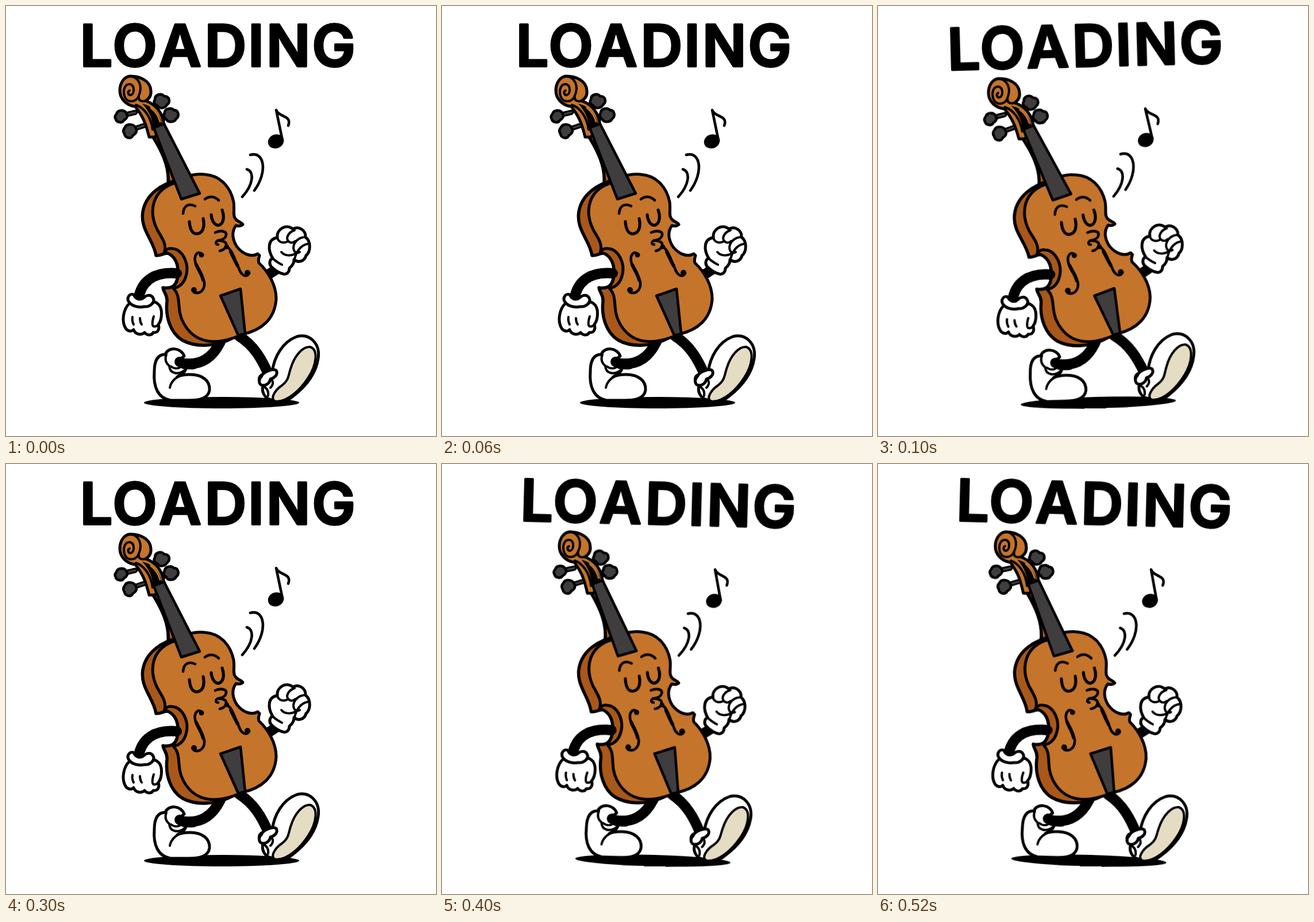
An HTML page that plays this animation: 748 px wide and 748 px high, repeating every 0.6 s.

```html
<!DOCTYPE html>
<html lang="en">
<head>
<meta charset="utf-8">
<title>Loading</title>
<style>
  html, body { margin: 0; width: 100%; height: 100%; overflow: hidden; background: #fff; }
  svg { display: block; width: 100vw; height: 100vh; }
  #scene { transform-origin: 374px 374px; }
  path, ellipse, circle { stroke-linecap: round; stroke-linejoin: round; }
  .ink { fill: none; stroke: #000; stroke-width: 4.6; }
  .thin { stroke-width: 4; }
  .limb { fill: none; stroke: #000; stroke-width: 18; }
  .glove { fill: #fff; stroke: #000; stroke-width: 5; }
  .front { fill: #c5742b; stroke: #000; stroke-width: 5; }
  .side { fill: #a9581a; stroke: #000; stroke-width: 5.5; }
  .ebony { fill: #3f3d3d; stroke: #000; stroke-width: 4.5; }
  .sole { fill: #e5dcc4; stroke: #000; stroke-width: 4; }
  .title { font: 600 101px Inter, "Open Sans", sans-serif; text-anchor: middle;
    stroke: #000; stroke-width: 3.5; stroke-linejoin: round; }
</style>
</head>
<body>
<svg viewBox="0 0 748 748">
<g id="scene">
  <text class="title" y="104.5" x="157 224 303 382 435 491 570">LOADING</text>

  <ellipse cx="375" cy="690" rx="135" ry="10"/>

  <!-- whistle and note -->
  <path class="ink" d="M419 284C432 288 431 310 411 332M425 259C449 252 456 288 432 321"/>
  <g transform="translate(1)">
    <ellipse cx="468.500" cy="235.500" rx="14" ry="12" transform="rotate(-22 468.500 235.500)"/>
    <path class="ink" d="M480 234L469 181C474 194 497 190 490 208"/>
  </g>

  <!-- legs -->
  <path class="limb" d="M373 584C359 613 337 627 304 621"/>
  <path class="limb" d="M405 574C431 590 445 614 457 642"/>

  <!-- rear shoe -->
  <path class="glove" d="M277 606C282 592 305 594 310 609L302 615C296 618 299 628 313 630C312 638 304 641 298 645C304 642 312 641 320 641C342 641 355 652 354 668C352 683 336 686 318 686H286C264 682 256 662 258 636C258 615 265 606 277 606Z"/>
  <path class="limb" d="M326 623C316 624 308 622 302 619"/>
  <path class="ink thin" d="M279 606C276 614 278 621 284 626C285 640 299 642 310 634M287 627C292 631 298 631 302 629M285 664C287 653 296 645 306 642"/>

  <!-- leading shoe -->
  <path class="glove" d="M463 637C466 611 481 584 506 575C529 569 547 588 543 613C539 640 521 662 499 679C487 689 471 691 461 685C450 682 444 672 447 660C438 656 438 643 447 641Z"/>
  <path class="sole" d="M495 631C502 607 517 592 529 593C544 598 540 625 526 646C512 668 490 688 470 688C457 685 468 668 480 660C492 651 491 643 495 631Z"/>
  <path class="glove" d="M444 645C447 636 465 630 470 634C474 641 467 647 460 649C459 655 454 660 447 660C439 659 439 650 444 645Z"/>
  <path class="ink thin" d="M460 649C465 651 466 658 460 664M447 661C455 665 457 671 456 678"/>

  <!-- raised fist -->
  <path class="limb" d="M447 472C455 468 462 464 469 459"/>
  <path class="glove" d="M472 403C470 388 488 378 499 388C509 382 522 390 521 402C531 410 530 427 522 434C519 445 508 447 501 441C501 448 497 453 493 456C493 463 488 468 482 466C473 464 466 458 461 453C457 448 459 440 464 439C455 424 455 405 472 403Z"/>
  <path class="ink thin" d="M502 390C492 393 486 403 491 409C495 413 500 412 503 409M521 402C509 402 500 411 500 421C501 429 506 431 511 428M524 414C513 416 505 427 502 440M472 403C474 411 482 414 491 409M479 428C485 435 496 435 503 431M464 439C470 445 476 448 480 450"/>

  <!-- neck -->
  <path class="side" d="M254 225L264 222L306 294L301 306L282 307C284 279 271 252 254 225Z"/>

  <!-- ribs -->
  <path class="side" d="M302 302C270 309 243 328 238 358C233 389 257 407 261 434C268 435 274 430 281 430C291 434 298 444 299 458C300 474 297 483 290 488C284 491 278 491 273 490C274 499 281 501 280 514C277 541 286 568 306 581C331 595 367 592 393 578Z"/>

  <!-- belly -->
  <path class="front" d="M300 306C313 294 333 291 346 293C374 295 391 316 396 341C398 355 394 364 399 370C403 376 409 375 412 380C409 383 404 383 400 382C391 394 395 409 402 419C413 433 428 437 438 431L441 434C440 439 438 441 440 447C456 462 470 485 470 509C468 545 444 564 412 571C392 580 372 586 352 583C319 578 302 548 301 522C300 507 299 499 291 491C303 489 311 481 314 466C318 447 307 423 289 422C280 421 277 425 275 430C281 414 270 402 263 389C248 358 252 318 300 306Z"/>

  <!-- pegs behind -->
  <path class="ink" style="stroke-width:9" d="M254 177L267 170M267 199L282 192"/>
  <g class="ebony">
    <path d="M259 163C259 153 271 151 275 157C284 156 287 167 280 172C276 179 266 179 263 173C258 171 256 167 259 163Z"/>
    <path d="M276 186C276 178 288 176 292 181C301 181 302 193 296 196C293 203 281 203 279 197C274 195 273 189 276 186Z"/>
  </g>

  <g transform="translate(2 1)">
    <!-- scroll and pegbox -->
    <path class="front" d="M214 121C231 121 249 129 250 146C251 155 246 161 241 164C258 170 270 183 273 206L257 227L247 227C242 207 238 193 223 174C208 172 196 161 196 146C196 132 204 122 214 121Z"/>
    <path d="M235 169C251 172 267 186 270 207L253 215C255 198 247 182 235 169Z"/>
    <path d="M250 176C260 184 263 191 266 200" fill="none" stroke="#c5742b" stroke-width="3"/>
    <path class="ink thin" d="M214 121C230 123 236 139 229 155C225 167 208 169 204 155C201 143 206 134 214 135C222 137 222 152 215 154C210 154 209 148 213 146M229 157C228 163 233 166 241 164M224 171C238 176 250 191 253 214"/>

    <!-- pegs in front -->
    <path class="ink" style="stroke-width:9" d="M202 189L223 184M217 214L238 207"/>
    <path d="M202 189L223 184M217 214L238 207" fill="none" stroke="#3f3d3d" stroke-width="3"/>
    <g class="ebony">
      <path d="M190 187C192 179 204 179 207 185C212 190 207 196 203 198C200 204 190 201 189 196C187 193 187 190 190 187Z"/>
      <path d="M205 210C208 203 220 204 223 210C228 217 223 222 219 224C215 232 204 228 204 221C201 218 202 213 205 210Z"/>
    </g>
  </g>

  <!-- fingerboard and tailpiece -->
  <path class="ebony" d="M257 212L275 205L337 326L305 336Z"/>
  <path class="ebony" d="M373 504L408 492L416 570L404 573Z"/>

  <!-- face -->
  <path class="ink" d="M308 361C309 346 319 343 329 348M346 336C354 330 363 331 370 338"/>
  <path class="ink" style="stroke-width:5.200" d="M319 375C320 391 326 398 334 396C343 394 346 383 343 370M357 363C358 376 365 383 371 381C379 378 380 366 376 355"/>
  <path class="ink" d="M364 394C372 390 384 391 383 398C382 405 376 407 368 408C378 408 384 411 383 416C382 422 376 425 372 426M366 410C364 413 366 415 369 415"/>

  <!-- sound holes -->
  <path class="ink" d="M340 431C334 425 327 433 329 444C331 458 343 469 345 481C346 494 337 502 327 498M383 418C395 425 398 443 405 456C409 469 418 473 423 465"/>
  <path class="ink" style="stroke-width:6" d="M331 450C335 459 341 467 343 477M391 428C396 438 399 445 403 452"/>
  <circle cx="340" cy="433" r="4.500"/>
  <circle cx="327" cy="494" r="5"/>
  <circle cx="384" cy="419" r="4"/>
  <circle cx="420" cy="464" r="5"/>

  <!-- swinging arm -->
  <path class="limb" d="M297 465C259 462 235 477 230 511"/>
  <path class="glove" d="M215 517C204 527 200 549 209 562C214 567 219 566 222 563C225 572 236 573 241 568C246 574 254 573 256 568C266 569 267 560 265 554C272 545 273 524 264 518C260 514 255 514 250 515Z"/>
  <path class="glove" d="M222 502C215 499 209 508 214 515C219 522 230 525 240 523C250 524 260 516 256 508C252 501 244 503 240 507C234 512 226 511 222 502Z"/>
  <path class="ink thin" d="M220 541C219 546 220 550 222 554M233 543C233 548 234 551 236 554M257 540C255 546 254 550 255 555M265 554C262 558 259 558 256 557"/>
</g>
</svg>
<script>
  const LOOP = 600;
  // start time in ms, tilt in degrees
  const poses = [[0, 0], [100, -1.5], [300, 0], [400, 1.5], [LOOP, 0]];
  const frames = poses.map(([ms, deg]) => ({
    offset: ms / LOOP,
    transform: `rotate(${deg}deg)`,
    easing: "step-end"
  }));
  document.getElementById("scene").animate(frames, { duration: LOOP, iterations: Infinity });
</script>
</body>
</html>
```
